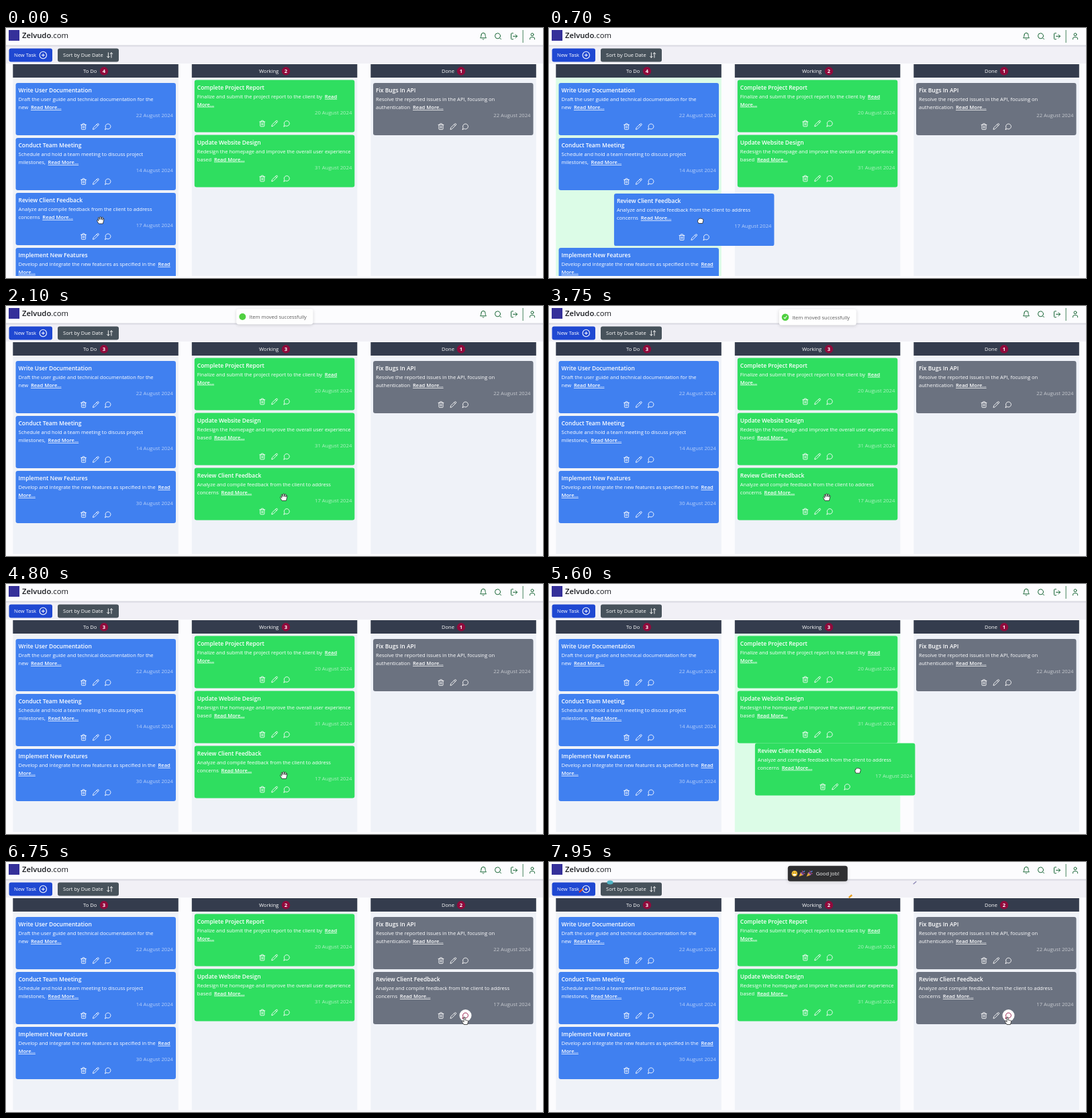
An HTML page that plays this animation: 800 px wide and 373 px high, repeating every 8000 ms.

```html
<!DOCTYPE html>
<html lang="en">
<head>
<meta charset="utf-8">
<title>Task board</title>
<style>
  html, body { margin: 0; width: 100%; height: 100%; overflow: hidden; background: #fcfcfe; }
  svg { display: block; width: 800px; height: 373px; font: 7.57px "Open Sans", "Noto Sans", sans-serif; }
  text { fill: #fff; white-space: pre; }
  .title { font-size: 8.48px; font-weight: 600; }
  .link { font-weight: 600; text-decoration: underline; }
  .date { font-size: 7.7px; text-anchor: end; fill-opacity: .62; }
  .count { font-weight: 700; text-anchor: middle; }
  .brand { font-size: 11.3px; fill: #16181d; }
  .brand tspan { font-weight: 600; }
  .icon { fill: none; stroke: #fff; stroke-width: 2; stroke-linecap: round; stroke-linejoin: round; }
  .nav .icon { stroke: #166534; }
  .cursor { fill: #fff; stroke: #222; stroke-width: .8; stroke-linejoin: round; }
  .toast { filter: drop-shadow(0 1.5px 2.5px rgba(0, 0, 0, .16)); }
</style>
</head>
<body>
<script>
const LOOP = 8000;
const BLUE = '#4080f0', GREEN = '#2fde60', GRAY = '#6b7280';
const IDLE = '#eff2f8', ACTIVE = '#dcfce7', CRIMSON = '#900a3c';

const ICONS = {
  bell: 'M6 8a6 6 0 0 1 12 0c0 7 3 9 3 9H3s3-2 3-9M10.3 21a1.94 1.94 0 0 0 3.4 0',
  search: 'M19 11a8 8 0 1 1-16 0a8 8 0 1 1 16 0M21 21l-4.3-4.3',
  exit: 'M9 21H5a2 2 0 0 1-2-2V5a2 2 0 0 1 2-2h4M16 17l5-5-5-5M21 12H9',
  user: 'M19 21v-2a4 4 0 0 0-4-4H9a4 4 0 0 0-4 4v2M16 7a4 4 0 1 1-8 0a4 4 0 1 1 8 0',
  trash: 'M3 6h18M19 6v14a2 2 0 0 1-2 2H7a2 2 0 0 1-2-2V6M8 6V4a2 2 0 0 1 2-2h4a2 2 0 0 1 2 2v2M10 11v6M14 11v6',
  pencil: 'M17 3a2.85 2.83 0 1 1 4 4L7.5 20.5 2 22l1.5-5.5ZM15 5l4 4',
  chat: 'M7.9 20A9 9 0 1 0 4 16.1L2 22Z',
  plus: 'M22 12a10 10 0 1 1-20 0a10 10 0 1 1 20 0M8 12h8M12 8v8',
  sort: 'M3 16l4 4 4-4M7 20V4M21 8l-4-4-4 4M17 4v16'
};
const CURSORS = {
  open: 'M-3 5L-5.2 1Q-6-.5-4.8-.8L-3.2.8L-3.8-3.6Q-3.6-5-2.4-4.2L-1.6-1L-1.2-5Q-.2-6.2.6-5L.7-1L1.8-4.6Q2.9-5.4 3.3-4.2L2.8-.6L4-2.6Q5.2-3 5-1.6L3.4 5Z',
  closed: 'M-3 4L-4.4.6Q-4.6-1-3.2-1L-3-2.4Q-2-4-1-3Q0-4.2 1-3Q2.2-3.8 2.8-2.4Q4.4-2.4 4.2-.6L3 4Z',
  pointer: 'M-2 5.5L-4.6 1.4Q-4.8 0-3.4.2L-2 1.6V-5Q-1-6.4 0-5V-1Q1-1.8 1.8-.8Q3-1.2 3.4-.2Q4.8 0 4.6 1.2L3.4 5.5Z'
};

const rect = (x, y, w, h, fill, extra = '') =>
  `<rect x="${x}" y="${y}" width="${w}" height="${h}" fill="${fill}" ${extra}/>`;
const text = (x, y, content, cls = '', extra = '') =>
  `<text x="${x}" y="${y}" class="${cls}" ${extra}>${content}</text>`;
const icon = (name, cx, cy, size, extra = '') =>
  `<path class="icon" d="${ICONS[name]}" transform="translate(${cx - size / 2} ${cy - size / 2}) scale(${size / 24})" ${extra}/>`;

// "|" separates the description from the underlined link
function line(y, content) {
  const [plain, link] = content.split('|');
  const tail = link ? `<tspan class="link" dx="${plain ? 3.8 : 0}">${link}</tspan>` : '';
  return text(4, y, plain + tail);
}

function card(id, x, y, fill, title, lines, date) {
  return `<g id="${id}" transform="translate(${x} ${y})">
    ${rect(0, 0, 238.5, 78, fill, 'rx="3.2"')}
    ${text(4, 14.4, title, 'title')}
    ${line(27.3, lines[0])}${line(39.1, lines[1])}
    ${text(234.5, 51.2, date, 'date')}
    ${icon('trash', 101, 65, 10.5)}${icon('pencil', 119.3, 65, 10.5)}
    <circle class="hover" cx="137.5" cy="65" r="9" fill="#fff" visibility="hidden"/>
    ${icon('chat', 137.5, 65, 10.5)}</g>`;
}

function column(id, x, name, nameX, badgeX) {
  return `${rect(x, 74, 246.5, 296, IDLE, `id="${id}"`)}
    ${rect(x, 54, 246.5, 20, '#343c4d')}
    ${text(nameX, 67.2, name)}
    <circle cx="${badgeX}" cy="64.3" r="6.2" fill="${CRIMSON}"/>
    ${text(badgeX, 67.1, '', 'count', `id="${id}Count"`)}`;
}

const popper = x => `<g transform="translate(${x} 0)">
  <path d="M-4.5 4.5L-1.8-2L2.2 2Z" fill="#e3a93a"/>
  <path d="M-1.6-1.8L2 1.8" stroke="#8b4fc0" stroke-width="1.6"/>
  <path d="M.5-1Q1.8-2.8.6-4.4M2 .4Q3.4-1 4.6.2" fill="none" stroke="#d8529a" stroke-width="1"/>
  <path d="M2-2L4.2-4" stroke="#5a8af0" stroke-width="1.2"/></g>`;

const confetti = [
  { x: 48, vx: 14, start: 7240, tilt: -42, shape: '<path d="M-4 0H0" stroke="#e2342c" stroke-width="2.2"/><path d="M0 0H4" stroke="#f07a28" stroke-width="2"/>' },
  { x: 91, vx: -12, start: 7337, tilt: 0, shape: '<ellipse rx="4.6" ry="3" fill="#4fb4c4"/>' },
  { x: 449, vx: 20, start: 7178, tilt: -40, shape: '<path d="M-3 0H3" stroke="#e8a020" stroke-width="2.4"/>' },
  { x: 545, vx: -18, start: 7332, tilt: -40, shape: '<path d="M-3 0H3" stroke="#8a84b4" stroke-width="1.3"/>' }
];

document.body.innerHTML = `<svg viewBox="0 0 800 373">
  <clipPath id="board"><rect width="800" height="370"/></clipPath>
  ${rect(0, 0, 800, 373, '#fcfcfe')}
  ${rect(0, 27, 800, 26, '#f1f0f6')}
  ${rect(0, 25.6, 800, 1.2, '#cfcfd8')}${rect(0, 26.8, 800, 1.2, '#e4e4ec')}
  ${rect(4, 3, 16, 16, '#35309a')}
  ${text(24, 15.3, '<tspan>Zelvudo</tspan>.com', 'brand')}
  <g class="nav">${icon('bell', 711, 12.3, 12)}${icon('search', 733, 12.3, 12)}
    ${icon('exit', 757, 12.3, 12)}${rect(769.7, 3, .8, 19, '#166534')}${icon('user', 784, 12.3, 12)}</g>
  ${rect(4.5, 30.5, 64.5, 20, '#1f48d2', 'rx="3"')}
  ${text(12, 43.3, 'New Task')}${icon('plus', 55.3, 40.5, 12.5)}
  ${rect(77, 30.5, 91, 20, '#47525b', 'rx="3"')}
  ${text(85, 43.3, 'Sort by Due Date')}${icon('sort', 154.7, 40.5, 11)}
  ${column('todo', 10.3, 'To Do', 115, 146)}
  ${column('working', 276.8, 'Working', 377, 417)}
  ${column('done', 543.3, 'Done', 649, 678)}
  <g clip-path="url(#board)">
    ${card('docs', 14.5, 82, BLUE, 'Write User Documentation', ['Draft the user guide and technical documentation for the', 'new|Read More...'], '22 August 2024')}
    ${card('meeting', 14.5, 164, BLUE, 'Conduct Team Meeting', ['Schedule and hold a team meeting to discuss project', 'milestones,|Read More...'], '14 August 2024')}
    ${card('features', 14.5, 328, BLUE, 'Implement New Features', ['Develop and integrate the new features as specified in the|Read', '|More...'], '30 August 2024')}
    ${card('report', 280.8, 77.5, GREEN, 'Complete Project Report', ['Finalize and submit the project report to the client by|Read', '|More...'], '20 August 2024')}
    ${card('website', 280.8, 159.5, GREEN, 'Update Website Design', ['Redesign the homepage and improve the overall user experience', 'based|Read More...'], '31 August 2024')}
    ${card('bugs', 547, 82, GRAY, 'Fix Bugs In API', ['Resolve the reported issues in the API, focusing on', 'authentication|Read More...'], '22 August 2024')}
    ${card('review', 14.5, 246, BLUE, 'Review Client Feedback', ['Analyze and compile feedback from the client to address', 'concerns|Read More...'], '17 August 2024')}
  </g>
  ${confetti.map((p, i) => `<g id="piece${i}">${p.shape}</g>`).join('')}
  <g id="moved" class="toast">
    ${rect(-57.5, -11.7, 115, 23.4, '#fff', 'rx="3.5"')}
    <g id="check"><circle r="5.3" fill="#4fd040"/>
      <path id="tick" d="M-2.2 .2L-.5 2L2.4-2" fill="none" stroke="#fff" stroke-width="1.1" stroke-dasharray="8"/></g>
    ${text(-38, 2.9, 'Item moved successfully', '', 'style="fill:#5c5c5c"')}
  </g>
  <g id="praise" class="toast">
    ${rect(-44.5, -11.5, 89, 23, '#2f2f31', 'rx="3.5"')}
    <g transform="translate(-34.5 0)"><circle r="4.3" fill="#f6c338"/>
      <path d="M-2.6 .6H2.6Q2 3.2 0 3.2T-2.6 .6" fill="#fff"/>
      <path d="M-2.4-1.1H-.9M.9-1.1H2.4" stroke="#6b4312" stroke-width=".8"/></g>
    ${popper(-23.5)}${popper(-12.2)}
    ${text(-2.5, 2.9, 'Good Job!')}
  </g>
  <path id="cursor" class="cursor"/>
</svg>`;

const $ = id => document.getElementById(id);
const set = (el, attrs) => { for (const k in attrs) el.setAttribute(k, attrs[k]); };
const ramp = (t, a, b) => Math.min(1, Math.max(0, (t - a) / (b - a)));
const swing = u => .5 - .5 * Math.cos(Math.PI * u);
const settle = u => 1 - (1 - u) ** 3;
const mix = (a, b, k) => [a[0] + (b[0] - a[0]) * k, a[1] + (b[1] - a[1]) * k];
const move = p => `translate(${p[0]} ${p[1]})`;

const review = $('review');
const hoverDisc = review.querySelector('.hover');
const chatIcon = hoverDisc.nextElementSibling;

const FIRST = { grab: 300, from: 400, to: 1200, release: 1450, drop: 1800 };
const SECOND = { grab: 5250, from: 5400, to: 6141, release: 6320, drop: 6680 };
const LAG = 52;
const SLOTS = [[14.5, 246], [280.8, 241.5], [547, 164]];

function cardPlace(t) {
  if (t < SECOND.grab) {
    const held = mix(SLOTS[0], [280, 249.5], swing(ramp(t, FIRST.from, FIRST.to)));
    return mix(held, SLOTS[1], settle(ramp(t, FIRST.release, FIRST.drop)));
  }
  const held = mix(SLOTS[1], [551, 200], swing(ramp(t, SECOND.from + LAG, SECOND.to + LAG)));
  return mix(held, SLOTS[2], settle(ramp(t, SECOND.release, SECOND.drop)));
}

function cursorPlace(t) {
  return t < SECOND.grab
    ? mix([141, 287], [414, 285.5], swing(ramp(t, FIRST.from, FIRST.to)))
    : mix([414, 285.5], [684, 237], swing(ramp(t, SECOND.from, SECOND.to)));
}

function showToast(el, t, cx, cy, start, end) {
  const enter = settle(ramp(t, start, start + 350));
  const leave = settle(ramp(t, end, end + 400));
  const y = cy - 47 * (1 - enter) - 35 * leave;
  const scale = (.6 + .4 * enter) * (1 - .4 * leave);
  set(el, {
    transform: `${move([cx, y])} scale(${scale})`,
    opacity: t < start ? 0 : (.5 + .5 * enter) * (1 - leave)
  });
}

function render(t) {
  const place = cardPlace(t);
  const landed = t >= SECOND.drop;
  const moved = t >= FIRST.drop;
  const dragging = [FIRST, SECOND].some(d => t >= d.grab && t < d.drop);
  const held = [FIRST, SECOND].some(d => t >= d.grab && t < d.release);
  const center = place[0] + 119;
  const over = !dragging ? '' : center < 267 ? 'todo' : center < 537 ? 'working' : 'done';

  set(review, { transform: move(place) });
  set(review.firstElementChild, { fill: landed ? GRAY : moved ? GREEN : BLUE });
  set(hoverDisc, { visibility: landed ? 'visible' : 'hidden' });
  chatIcon.style.stroke = landed ? CRIMSON : '';
  set($('features'), { transform: move([14.5, 328 - 82 * settle(ramp(t, 800, 1000))]) });

  for (const id of ['todo', 'working', 'done']) set($(id), { fill: id === over ? ACTIVE : IDLE });
  $('todoCount').textContent = moved ? 3 : 4;
  $('workingCount').textContent = moved && !landed ? 3 : 2;
  $('doneCount').textContent = landed ? 2 : 1;

  showToast($('moved'), t, 400.3, 16.7, 1840, 3850);
  set($('check'), { transform: `translate(-48.3 0) scale(${settle(ramp(t, 1940, 2200))})` });
  set($('tick'), { 'stroke-dashoffset': 8 * (1 - ramp(t, 2100, 2300)) });
  showToast($('praise'), t, 400.3, 17.3, 6850, 9000);

  confetti.forEach((p, i) => {
    const s = (t - p.start) / 1000, left = (7950 - t) / 1000;
    set($('piece' + i), {
      visibility: s > 0 ? 'visible' : 'hidden',
      transform: `${move([p.x - p.vx * left, -5 + 94 * s * s])} rotate(${p.tilt - 200 * left})`
    });
  });

  const shape = held ? 'closed' : landed ? 'pointer' : 'open';
  const [cx, cy] = cursorPlace(t);
  set($('cursor'), { d: CURSORS[shape], transform: move([cx, cy + (held ? 1 : 0)]) });
}

const began = performance.now();
function frame() {
  render((performance.now() - began) % LOOP);
  requestAnimationFrame(frame);
}
frame();
</script>
</body>
</html>
```
